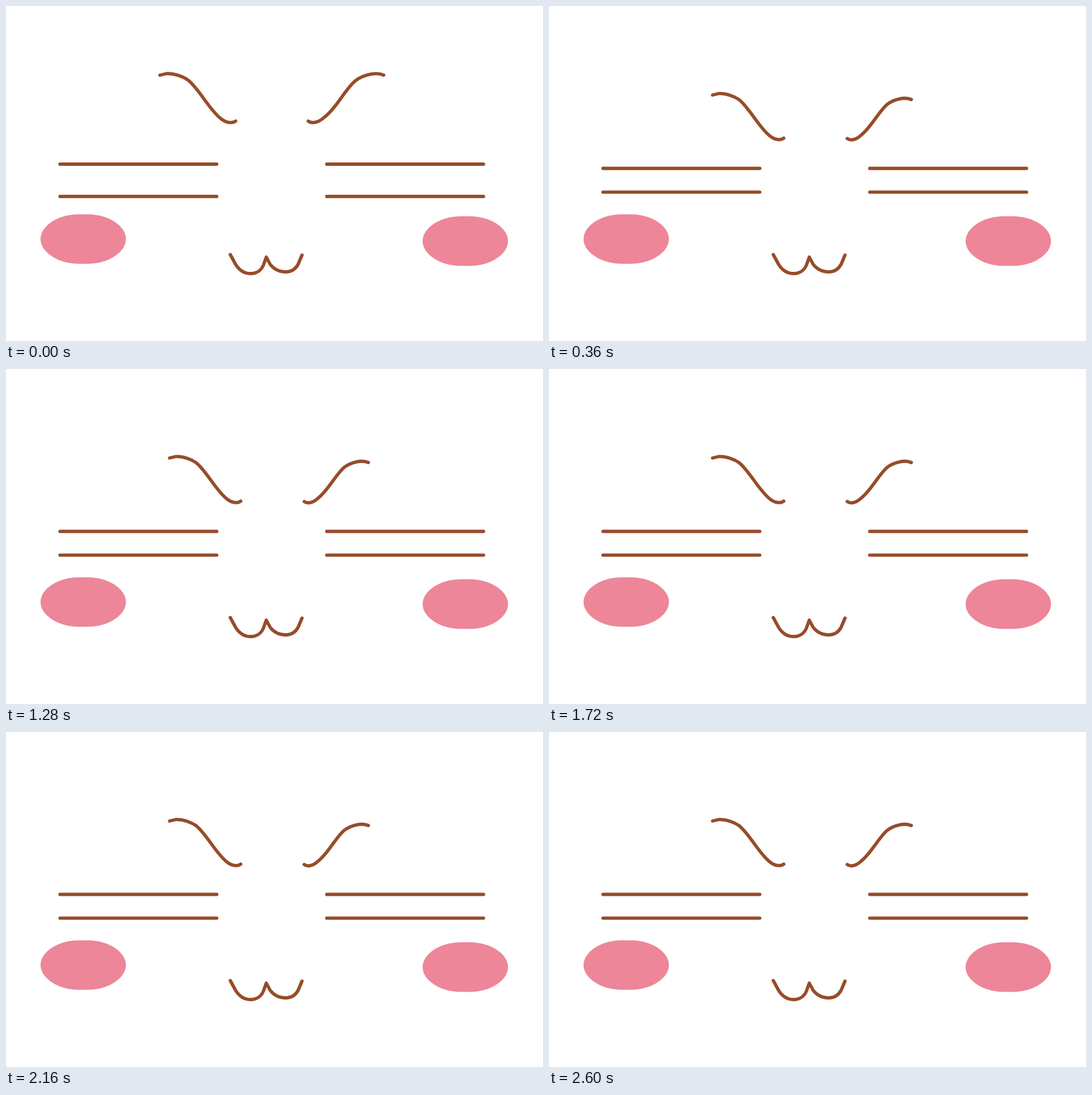
An HTML page with a canvas that plays this animation: 947 by 591 pixels, repeating every 2.92 s.

```html
<!DOCTYPE html>
<html lang="en">
<head>
<meta charset="utf-8">
<title>Frowning face</title>
<style>
  html, body { margin: 0; width: 100%; height: 100%; overflow: hidden; background: #fff; }
  canvas { display: block; }
</style>
</head>
<body>
<canvas id="stage" width="947" height="591"></canvas>
<script>
const ctx = document.getElementById('stage').getContext('2d');
const BROWN = '#964d29', PINK = '#ed8698';
const LOOP = 2920, STEP = 40;
const TWITCHES = [2480, 2040, 1600, 1160];

// Each brow shrinks towards its end pose: anchor point, its travel and final scale.
const brows = [
  { path: new Path2D('M271.5 122L283 119.3C297 118.5 313 125 321.5 131C341 147 358 182 378 198C388 206.5 399 207.5 405 203'),
    x: 271.5, y: 122, dx: 17, dy: 35, scale: 0.94 },
  { path: new Path2D('M666 122C653 116 630 121 616 132C598 147 582 181 561 196.5C551 206 539 208 533 203'),
    x: 666, y: 122, dx: -27, dy: 43, scale: 0.85 }
];
const mouth = new Path2D('M395.5 438.5L405 456C412 467 421 472 431 472C441 472 450 467 454 457L459 443L466 456C474 466 485 469.5 495 469C505 468.5 511 463 515 456L522 439.5');

const mix = (a, b, p) => a + (b - a) * p;

// Amount of frown, 0 to 1, held for one step at a time.
function frown(ms) {
  const t = Math.floor(ms % LOOP / STEP) * STEP;
  const start = TWITCHES.find(s => t >= s);
  if (start === undefined) return Math.min(1, t / 360);
  return mix(1 / 9, 1, Math.min(1, (t - start) / 120));
}

function cheek(cx, cy) {
  const w = 75.3, h = 43.7;
  ctx.beginPath();
  ctx.moveTo(cx - 9, cy - h);
  ctx.lineTo(cx + 9, cy - h);
  ctx.bezierCurveTo(cx + 43, cy - h, cx + w, cy - 24, cx + w, cy);
  ctx.bezierCurveTo(cx + w, cy + 24, cx + 43, cy + h, cx + 9, cy + h);
  ctx.lineTo(cx - 9, cy + h);
  ctx.bezierCurveTo(cx - 43, cy + h, cx - w, cy + 24, cx - w, cy);
  ctx.bezierCurveTo(cx - w, cy - 24, cx - 43, cy - h, cx - 9, cy - h);
  ctx.fill();
}

function whisker(x, y) {
  ctx.beginPath();
  ctx.moveTo(x, y);
  ctx.lineTo(x + 276.5, y);
  ctx.stroke();
}

function brow(b, p) {
  const moved = new Path2D();
  moved.addPath(b.path, new DOMMatrix()
    .translate(b.x + b.dx * p, b.y + b.dy * p)
    .scale(mix(1, b.scale, p))
    .translate(-b.x, -b.y));
  ctx.stroke(moved);
}

function draw(ms) {
  const p = frown(ms);
  ctx.fillStyle = '#fff';
  ctx.fillRect(0, 0, 947, 591);

  ctx.fillStyle = PINK;
  cheek(136.2, 411.1);
  cheek(810, 414.7);

  ctx.strokeStyle = BROWN;
  ctx.lineWidth = 5.8;
  ctx.lineCap = ctx.lineJoin = 'round';
  for (const x of [95.2, 565.6]) {
    whisker(x, mix(279, 286.5, p));
    whisker(x, mix(336, 328.3, p));
  }
  brows.forEach(b => brow(b, p));
  ctx.stroke(mouth);
}

function tick() {
  draw(performance.now());
  requestAnimationFrame(tick);
}
tick();
</script>
</body>
</html>
```
